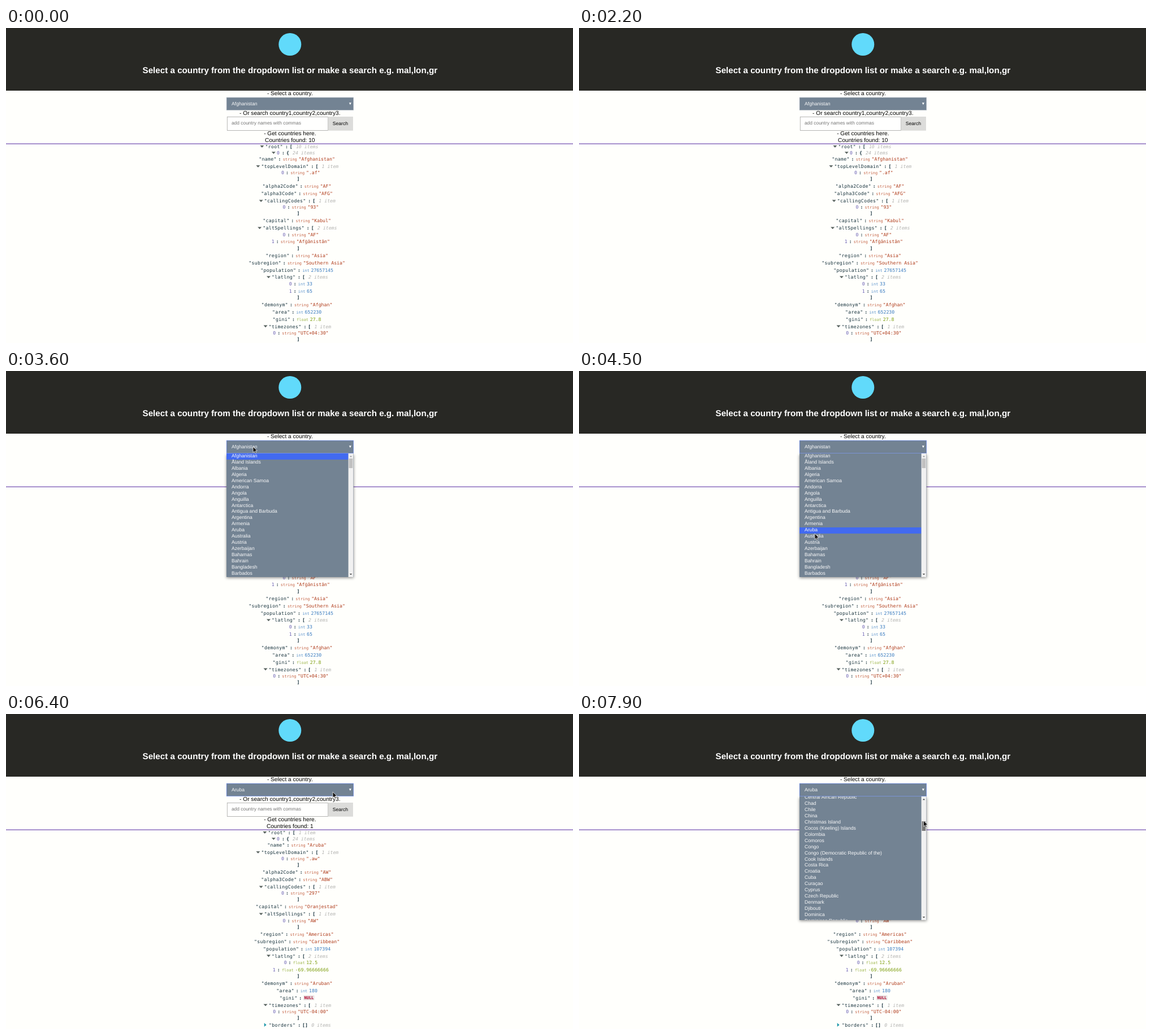
Recreate the animation shown at these times as an HTML page with a canvas. Size 1003 by 558 pixels, loop 8000 ms.

```html
<!DOCTYPE html>
<html lang="en">
<head>
<meta charset="utf-8">
<title>Country finder</title>
<style>
html, body { margin: 0; width: 100%; height: 100%; overflow: hidden; background: #fffffc; }
canvas { display: block; width: 1003px; height: 558px; }
</style>
</head>
<body>
<canvas id="stage" width="1003" height="558"></canvas>
<script>
const ctx = document.getElementById('stage').getContext('2d');
const LOOP = 8000, STEP = 100;
const SANS = '"Liberation Sans", Arial, sans-serif';
const MONO = '"DejaVu Sans Mono", monospace';
const SLATE = '#738393', INK = '#17323d', STRING = '#b03c1c';
const BODY = 10.13, SMALL = 8.62;

const countries = ('Afghanistan|Åland Islands|Albania|Algeria|American Samoa|Andorra|Angola|Anguilla|' +
  'Antarctica|Antigua and Barbuda|Argentina|Armenia|Aruba|Australia|Austria|Azerbaijan|Bahamas|' +
  'Bahrain|Bangladesh|Barbados|Belarus|Belgium|Belize|Benin|Bermuda|Bhutan|' +
  'Bolivia (Plurinational State of)|Bonaire, Sint Eustatius and Saba|Bosnia and Herzegovina|' +
  'Botswana|Bouvet Island|Brazil|British Indian Ocean Territory|' +
  'United States Minor Outlying Islands|Virgin Islands (British)|Virgin Islands (U.S.)|' +
  'Brunei Darussalam|Bulgaria|Burkina Faso|Burundi|Cambodia|Cameroon|Canada|Cabo Verde|' +
  'Cayman Islands|Central African Republic|Chad|Chile|China|Christmas Island|' +
  'Cocos (Keeling) Islands|Colombia|Comoros|Congo|Congo (Democratic Republic of the)|' +
  'Cook Islands|Costa Rica|Croatia|Cuba|Curaçao|Cyprus|Czech Republic|Denmark|Djibouti|' +
  'Dominica|Dominican Republic').split('|');

const afghanistan = {
  name: 'Afghanistan', topLevelDomain: ['.af'], alpha2Code: 'AF', alpha3Code: 'AFG',
  callingCodes: ['93'], capital: 'Kabul', altSpellings: ['AF', 'Afġānistān'],
  region: 'Asia', subregion: 'Southern Asia', population: 27657145, latlng: [33, 65],
  demonym: 'Afghan', area: 652230, gini: 27.8, timezones: ['UTC+04:30']
};
const aruba = {
  name: 'Aruba', topLevelDomain: ['.aw'], alpha2Code: 'AW', alpha3Code: 'ABW',
  callingCodes: ['297'], capital: 'Oranjestad', altSpellings: ['AW'],
  region: 'Americas', subregion: 'Caribbean', population: 107394, latlng: [12.5, -69.96666666],
  demonym: 'Aruban', area: 180, gini: null, timezones: ['UTC-04:00'], borders: []
};

// Pointer path: time, x, y
const pointerPath = [
  [2500, 132, 60], [3200, 437, 134], [3700, 437, 134], [4400, 417, 288], [4800, 417, 288],
  [5900, 560, 178], [6300, 578, 138], [6900, 578, 138], [7400, 610, 155], [7600, 610, 155],
  [7900, 609.5, 189]
];

function rect(x, y, w, h, color) {
  ctx.fillStyle = color;
  ctx.fillRect(x, y, w, h);
}

function poly(points, color) {
  ctx.beginPath();
  points.forEach(([x, y]) => ctx.lineTo(x, y));
  ctx.closePath();
  ctx.fillStyle = color;
  ctx.fill();
}

function text(str, x, y, size, color, { style = '', family = SANS, align = 'left', spacing = 0 } = {}) {
  ctx.font = `${style} ${size}px ${family}`;
  ctx.letterSpacing = spacing + 'px';
  ctx.textAlign = align;
  ctx.fillStyle = color;
  ctx.fillText(str, x, y);
}

const centered = (str, x, y, size = BODY, color = '#000', style = '') =>
  text(str, x, y, size, color, { style, align: 'center' });

// JSON tree
const CHAR = 4.955, KEY_CHAR = 5.27, TYPE_CHAR = 4.19;
const mono = (str, x, y, color, style = '', size = 8.23, spacing = 0) =>
  text(str, x, y, size, color, { style, family: MONO, spacing });

function drawKey(key, x, y) {
  const isIndex = typeof key === 'number';
  const label = isIndex ? String(key) : `"${key}"`;
  mono(label, x, y, isIndex ? '#6c62b4' : INK, '', 8.23, 0.317);
}

const keyWidth = key => (typeof key === 'number' ? 1 : key.length + 2) * KEY_CHAR;

function describe(value) {
  if (value === null) return { type: '', shown: 'NULL' };
  if (typeof value === 'string') return { type: 'string', shown: `"${value}"`, color: STRING, soft: '#c46244' };
  if (Number.isInteger(value)) return { type: 'int', shown: String(value), color: '#3a7cc0', soft: '#5a92cc' };
  return { type: 'float', shown: String(value), color: '#7f9f12', soft: '#9cb54a' };
}

function drawValue(key, value, center, y) {
  const { type, shown, color, soft } = describe(value);
  const kw = keyWidth(key), tw = type.length * TYPE_CHAR;
  const width = kw + 10.8 + (value === null ? 19 : tw + 2.7 + shown.length * CHAR);
  const x = center - width / 2, vx = x + kw + 10.8;
  drawKey(key, x, y);
  mono(':', x + kw + 2.7, y, INK, 'bold');
  if (value === null) {
    rect(vx, y - 7, 19, 8.4, '#e6dfdf');
    mono(shown, vx + 1.2, y - 0.3, '#b3082f', 'bold', 6.96);
  } else {
    mono(type, vx, y, soft, '', 6.96);
    mono(shown, vx + tw + 2.7, y, color);
  }
}

function drawGroup(key, bracket, count, center, y) {
  const items = `${count} item${count === 1 ? '' : 's'}`;
  const kw = keyWidth(key), extra = (bracket.length - 1) * CHAR;
  const x = center - (kw + 31.8 + extra + items.length * CHAR) / 2 + 9;
  const tx = x - 5.6, ty = y - 3;
  if (count) poly([[tx - 3.5, ty - 1.9], [tx + 3.5, ty - 1.9], [tx, ty + 1.9]], '#59635f');
  else poly([[tx - 2.6, ty - 3.4], [tx - 2.6, ty + 3.4], [tx + 1.3, ty]], '#2299ab');
  drawKey(key, x, y);
  mono(':', x + kw + 3.8, y, INK, 'bold');
  mono(bracket, x + kw + 11.7, y, INK, 'bold');
  mono(items, x + kw + 22.8 + extra, y, '#b2b2b0', 'italic');
}

function drawTree(record, total) {
  let y = 213;
  const shortStep = 11.1, longStep = 12.97;
  drawGroup('root', '[', total, 501, y);
  drawGroup(0, '{', 24, 508.3, y += shortStep);
  y += shortStep;
  for (const [key, value] of Object.entries(record)) {
    if (Array.isArray(value)) {
      drawGroup(key, value.length ? '[' : '[]', value.length, 515.4, y);
      value.forEach((item, i) => drawValue(i, item, 521.4, y += i ? longStep : shortStep));
      if (value.length) mono(']', 514.6, y += shortStep, INK, 'bold');
    } else {
      drawValue(key, value, 514.6, y);
    }
    y += longStep;
  }
}

// Page parts
function drawHeader(cx) {
  rect(0, 0, 1003, 111, '#282824');
  ctx.beginPath();
  ctx.arc(cx, 29, 20, 0, Math.PI * 2);
  ctx.fillStyle = '#61dafb';
  ctx.fill();
  centered('Select a country from the dropdown list or make a search e.g. mal,lon,gr',
    cx, 80.2, 15.2, '#fff', 'bold');
  centered('- Select a country.', cx, 119.2);
}

function drawSelect(cx, name, focused) {
  const x = cx - 112.4;
  rect(x, 122.8, 225, 23, focused ? '#6685dc' : '#a3adb6');
  rect(x + 0.8, 123.6, 223.4, 21.4, SLATE);
  text(name, x + 9.1, 137.1, SMALL, '#fafafa');
  const ax = x + 219;
  poly([[ax - 2, 132.2], [ax + 2, 132.2], [ax, 136.2]], '#fff');
}

function drawSearch(cx, dy) {
  const x = cx - 111.4;
  centered('- Or search country1,country2,country3.', cx, 153.8 + dy);
  rect(x, 157 + dy, 179, 24.8, '#a4a4a2');
  rect(x + 0.8, 157.8 + dy, 177.4, 23.2, '#fffffe');
  text('add country names with commas', x + 8, 171.4 + dy, 8.44, '#757575');
  rect(x + 178.6, 157 + dy, 44.4, 24.8, '#dcdcda');
  centered('Search', x + 200.5, 171.5 + dy, SMALL);
  centered('- Get countries here.', cx, 190 + dy);
}

function drawBar(label, cx, y) {
  rect(0, y, 1003, 24, SLATE);
  centered(label, cx, y + 14.2, BODY, '#000', 'bold');
}

function drawPopup(marked, scroll, dragging) {
  const x = 390, top = 146, pitch = 10.92, height = 219;
  ctx.save();
  ctx.shadowColor = 'rgba(0,0,0,.45)';
  ctx.shadowBlur = 5;
  ctx.shadowOffsetY = 1.5;
  rect(x, top, 224.6, height, SLATE);
  ctx.restore();
  ctx.save();
  ctx.beginPath();
  ctx.rect(x, top, 224.6, height);
  ctx.clip();
  rect(x, top + marked * pitch - scroll, 215.6, pitch, '#426af0');
  countries.forEach((name, i) => text(name, 399, 153.2 + i * pitch - scroll, SMALL, '#fafafa'));
  rect(605.6, top, 9, height, '#f1f1f1');
  rect(606.6, 155 + scroll * 35 / 494, 6.6, 17, dragging ? '#787878' : '#c1c1c1');
  poly([[607.8, 152.3], [612.2, 152.3], [610, 149.9]], scroll ? '#444' : '#999');
  poly([[607.8, 358.9], [612.2, 358.9], [610, 361.3]], '#444');
  ctx.restore();
}

function pointerAt(t) {
  if (t < pointerPath[0][0]) return null;
  const next = pointerPath.findIndex(p => p[0] > t);
  if (next < 0) return pointerPath[pointerPath.length - 1].slice(1);
  const [t0, x0, y0] = pointerPath[next - 1], [t1, x1, y1] = pointerPath[next];
  const u = (t - t0) / (t1 - t0), e = u * u * (3 - 2 * u);
  return [x0 + (x1 - x0) * e, y0 + (y1 - y0) * e];
}

function drawPointer([x, y]) {
  const shape = [[0, 0], [0, 10.4], [2.4, 8.2], [4, 11.8], [5.7, 11], [4.1, 7.5], [7.3, 7.3]];
  poly(shape.map(([dx, dy]) => [x + dx, y + dy]), '#111');
  ctx.strokeStyle = '#fff';
  ctx.lineWidth = 0.7;
  ctx.stroke();
}

function render(t) {
  const reloading = t >= 700 && t < 1700;
  const fetching = t >= 4800 && t < 5400;
  const second = t >= 4800;
  const open = (t >= 3400 && t < 4800) || t >= 6900;
  const pointer = pointerAt(t);
  const cx = reloading || fetching ? 506.7 : 502.3;

  ctx.textRendering = 'geometricPrecision';
  rect(0, 0, 1003, 558, '#fffffc');
  drawHeader(cx);
  if (reloading) drawBar('Names are loading...', cx, 122.8);
  else drawSelect(cx, second ? 'Aruba' : 'Afghanistan', t >= 3400);
  drawSearch(cx, reloading ? 1 : 0);

  if (reloading || fetching) {
    drawBar('Countries are loading...', cx, reloading ? 194 : 193);
  } else {
    const total = second ? 1 : 10;
    centered('Countries found: ' + total, cx, 201.6);
    rect(0, 204.5, 1003, 1.4, '#8363bb');
    drawTree(second ? aruba : afghanistan, total);
  }

  if (open) {
    const [px, py] = pointer;
    const dragging = t >= 7600;
    const hovering = px < 605 && py > 148;
    const marked = hovering ? Math.floor((py - 148) / 10.92) : second ? 12 : 0;
    drawPopup(marked, dragging ? (py - 155) * 494.3 / 34 : 0, dragging);
  }
  if (pointer) drawPointer(pointer);
}

const start = performance.now();
function tick() {
  const t = (performance.now() - start) % LOOP;
  render(Math.floor(t / STEP) * STEP);
  requestAnimationFrame(tick);
}
tick();
</script>
</body>
</html>
```
